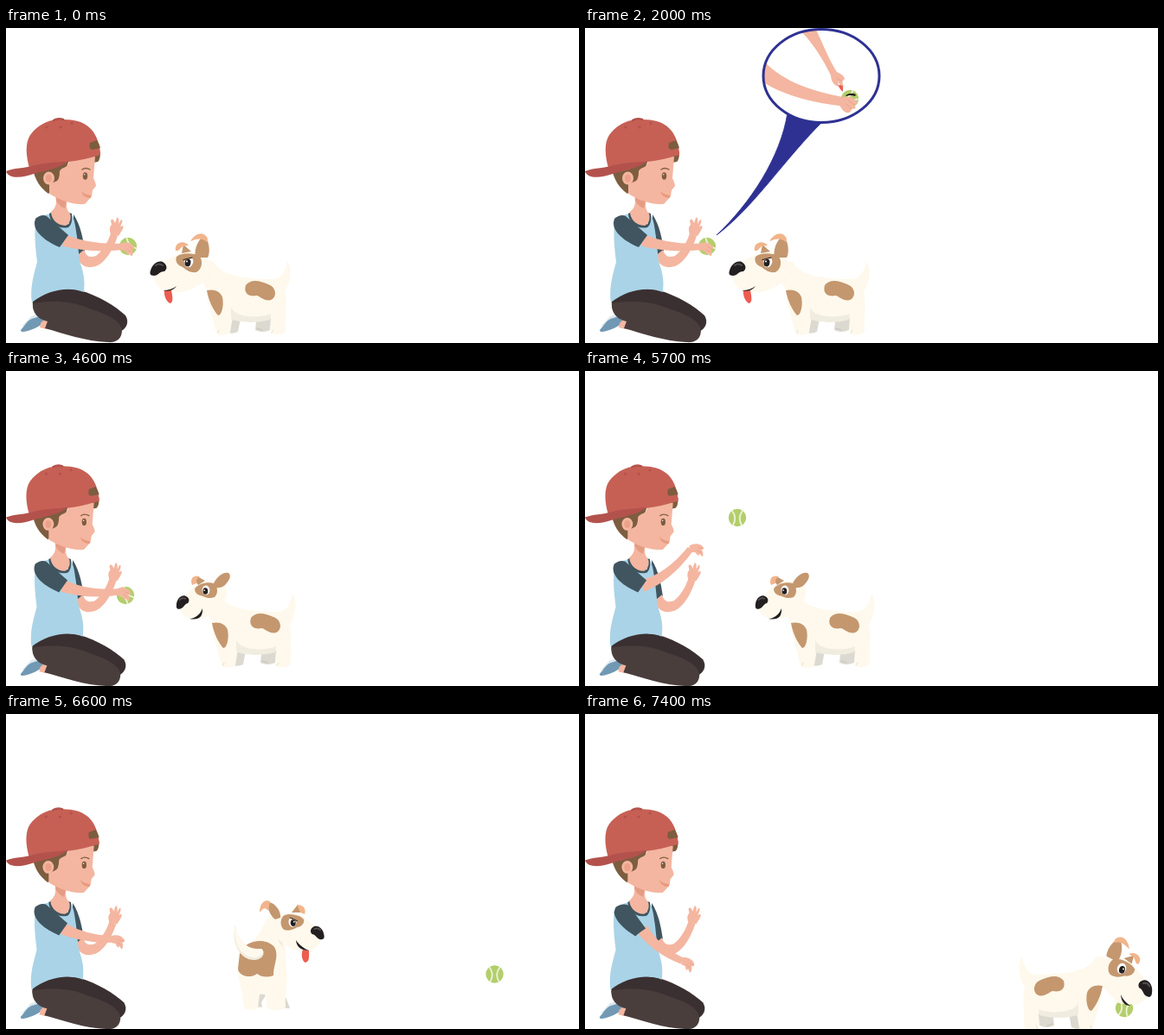
Write an HTML page with a canvas that moves like this. It is 662x365 px and loops after 8000 ms.

```html
<!DOCTYPE html>
<html lang="en">
<head>
<meta charset="utf-8">
<title>Fetch</title>
<style>
html, body { margin: 0; width: 100%; height: 100%; overflow: hidden; background: #fff; }
canvas { display: block; width: 662px; height: 365px; }
</style>
</head>
<body>
<canvas id="stage"></canvas>
<script>
const W = 662, H = 365, LOOP = 8000, STEP = 100;
const canvas = document.getElementById('stage');
const ctx = canvas.getContext('2d');
const dpr = window.devicePixelRatio || 1;
canvas.width = W * dpr;
canvas.height = H * dpr;

const SKIN = '#f4b6a0', SHADE = '#e59c85', HAIR = '#7d5d3f', CAP = '#c66055', BRIM = '#b3524c';
const SHIRT = '#aad3e7', SLEEVE = '#40555f', INK = '#231f20', NAVY = '#2e3192';
const CREAM = '#fef9ec', DUSK = '#f0ecdf', GREY = '#dcd9d0', TAN = '#c4976f', PEACH = '#f2b48b', RED = '#ee5c50';

function fill(color, d) {
  ctx.fillStyle = color;
  ctx.fill(new Path2D(d));
}
function line(color, width, d) {
  ctx.strokeStyle = color;
  ctx.lineWidth = width;
  ctx.lineCap = 'round';
  ctx.stroke(new Path2D(d));
}
function oval(color, x, y, rx, ry = rx, rot = 0) {
  ctx.fillStyle = color;
  ctx.beginPath();
  ctx.ellipse(x, y, rx, ry, rot, 0, 7);
  ctx.fill();
}
function at(x, y, rot, sx, sy, draw) {
  ctx.save();
  ctx.translate(x, y);
  ctx.rotate(rot);
  ctx.scale(sx, sy);
  draw();
  ctx.restore();
}
// Keys are rows of [time, ...values].
function track(keys, t) {
  let i = 0;
  while (i < keys.length - 1 && keys[i + 1][0] <= t) i++;
  const a = keys[i], b = keys[i + 1] || a;
  const k = a === b ? 0 : (t - a[0]) / (b[0] - a[0]);
  return a.slice(1).map((v, j) => v + (b[j + 1] - v) * k);
}

// Bend point, wrist and hand angle of the near arm.
const ARM = [
  [0, 96, 256, 133, 253.5, 0], [4500, 96, 256, 133, 253.5, 0],
  [4600, 94, 260, 129, 256, 0], [4900, 94, 260, 129, 256, 0],
  [5200, 92, 265, 121, 269, .3], [5400, 96, 248, 126, 226, -.1],
  [5500, 96, 240, 122, 206, -.15], [5900, 96, 240, 122, 206, -.15],
  [6300, 98, 256, 125, 250, 0], [6600, 92, 261, 122, 261, .05],
  [6900, 90, 267, 119, 273, .15], [7200, 82, 273, 112, 286, .25], [8000, 82, 273, 112, 286, .25]
];
const BALL = [
  [0, 141, 253], [4500, 141, 253], [4600, 138, 260], [4900, 138, 260],
  [5200, 130, 273], [5400, 137, 224], [5500, 137, 197], [5600, 153, 178], [5700, 176, 170],
  [5800, 206, 168.5], [6000, 272, 174], [6300, 386, 209], [6600, 564.5, 301.5],
  [6700, 590, 329], [6900, 621, 354], [7300, 621, 354], [7400, 623, 341]
];

function ball(x, y, rot = 0) {
  at(x, y, rot, 1, 1, () => {
    oval('#b3ce6b', 0, 0, 10.2);
    line('#edf3da', 1.8, 'M-6 -8Q0 0 -5 8.5M6 -8Q0 0 5 8.5');
  });
}

function hand() {
  fill(SKIN, 'M-1 -3.7C5 -6 11 -5 14 -1C16 1 15 3 13 3L12 2C14 6 14 10 12 11L9 7C9 10 7 10 5 5L0 4Z');
  line(SHADE, .7, 'M7 3L11 6M9 0L13 2');
}

function arm([cx, cy, wx, wy, rot], bx, by) {
  const n0 = Math.atan2(cy - by, cx - bx) + Math.PI / 2;
  const n1 = Math.atan2(wy - cy, wx - cx) + Math.PI / 2;
  const off = (x, y, a, r) => [x + Math.cos(a) * r, y + Math.sin(a) * r];
  const mid = (n0 + n1) / 2;
  ctx.fillStyle = SKIN;
  ctx.beginPath();
  ctx.moveTo(...off(bx, by, n0, 7));
  ctx.quadraticCurveTo(...off(cx, cy, mid, 5), ...off(wx, wy, n1, 3.8));
  ctx.lineTo(...off(wx, wy, n1, -3.8));
  ctx.quadraticCurveTo(...off(cx, cy, mid, -5), ...off(bx, by, n0, -7));
  ctx.fill();
  at(wx, wy, rot, 1, 1, hand);
}

function boyBack() {
  fill(SLEEVE, 'M78 216C86 228 89 244 91 258L83 265L78 235Z');
  fill(SKIN, 'M84 262L90 257C93 266 98 266 104 264C113 257 118 247 121 238L129 241C124 256 115 272 104 276C95 279 87 276 84 269Z');
  fill(SKIN, 'M121 239C119 233 120 230 122 228L121 223C123 220 125 223 126 226L128 220C130 219 131 221 130 227L133 222C135 222 135 225 132 230L135 229C137 231 133 236 130 241Z');
  // shoe, ankle, trousers
  fill('#dce9ef', 'M18 346L29 334L39 331L31 342Z');
  fill('#7199b4', 'M17 350C22 345 25 337 33 336L44 332L47 338C40 346 28 351 20 352Q17 352 17 350Z');
  fill(SKIN, 'M40 342L45 337L50 340L47 349L39 347Z');
  fill('#3b3031', 'M31 314C48 303 66 300 86 304C108 311 126 322 138 333C143 341 139 349 131 352L70 342L40 337C32 331 30 322 31 314Z');
  fill('#4a3e3d', 'M31 319C55 315 78 317 96 325C115 331 132 338 134 350C134 360 128 365 117 364C92 363 67 354 45 348L48 340C36 337 30 329 31 319Z');
  // shirt, neck
  fill(SHIRT, 'M35 222C43 217 50 215 55 214L74 214C79 219 80 228 82 242L85 270C91 287 91 294 90 306C73 299 48 303 30 318C27 299 34 280 36 271C34 254 32 237 35 222Z');
  fill(SLEEVE, 'M50 215L54 213C53 226 64 230 73 227L72 214L76 215C77 224 75 229 72 231C60 234 50 225 50 215Z');
  fill(SKIN, 'M57 194L71 198C69 206 70 211 74 215C76 222 73 227 69 229C58 229 52 220 52 213C58 208 59 203 57 194Z');
  fill(SHADE, 'M58 195L70 200L68 209Q62 207 58 200Z');
}

function boyHead() {
  fill(HAIR, 'M31 164L73 152L66 175L49 192C39 185 34 176 31 164Z');
  fill(HAIR, 'M102 147L109 143Q109 153 106 155L101 156Z');
  fill(SKIN, 'M50 181L57 178Q62 177 62 166C65 160 71 164 73 154L103 149L101 174Q104 180 104 183L100 188L99 195Q93 202 91 204C80 205 64 201 50 192Z');
  oval(SKIN, 49.5, 174, 6.5, 7.5);
  oval('#eca28a', 49.5, 174, 3.6, 4.6);
  oval(HAIR, 91.5, 171.5, 2.7, 4.2);
  oval('#fff', 90.8, 169.7, .7);
  line(HAIR, 1.4, 'M88 164Q92 161 97 164');
  fill('#e99a7e', 'M87 189Q91 193 98 194L98 197Q89 197 87 189Z');
  fill(CAP, 'M27 162C23 148 22 133 28 124C35 114 46 108 54 107Q60 103 67 106C92 106 101 118 105 128C108 135 109 142 109 147Q90 153 72 155Q47 157 27 162Z');
  fill(BRIM, 'M0 166C9 162 20 163 33 159C49 155 61 156 73 154C60 164 43 165 32 169C18 174 3 175 0 166Z');
  line(BRIM, 2.5, 'M55 107Q60 104 66 106');
  for (const [x, y] of [[47, 115], [63, 115], [76, 110.5]]) oval(BRIM, x, y, 1.7, 1.4);
  fill(HAIR, 'M97 133L105 130Q108 135 109 139L100 141Q95 141 97 133Z');
}

function boy(t) {
  const near = t < 4600;
  const fit = draw => near ? draw() : at(0, 5.7, 0, .987, .987, draw);
  const pose = track(ARM, t);
  fit(() => { boyBack(); boyHead(); });
  if (t < 5600) {
    ball(...track(BALL, t), -.8);
    if (t >= 3000 && near) line(INK, 1.6, 'M137 246Q141 243 146 246');
  }
  arm(pose, near ? 67 : 66, near ? 246 : 249);
  if (t >= 7100) fit(() => fill(SLEEVE, 'M36 221Q46 215 52 220L71 246Q66 249 59 255C46 247 35 237 34 227Z'));
  else fit(() => fill(SLEEVE, 'M34 221Q41 215 47 218L72 240L62 254C45 247 32 236 33 225Z'));
  if (t >= 3200 && t < 3600) {
    const [x, y] = t < 3400 ? [136, 236] : [138, 241.5];
    oval(RED, x, y, 1.8, 3, -.3);
  }
}

function callout(t) {
  const wedge = 'M234 98C226 150 191 203 152 240C195 208 232 150 276 107Z';
  fill(NAVY, wedge);
  line(NAVY, .8, wedge);
  const bubble = new Path2D();
  bubble.ellipse(273, 55.5, 67, 54, 0, 0, 7);
  ctx.fillStyle = '#fff';
  ctx.fill(bubble);
  ctx.save();
  ctx.clip(bubble);
  ball(306, 82, 1);
  if (t >= 2000) fill(INK, 'M301 78Q307 74 313 77L312 79Q306 77 302 79Z');
  fill(SKIN, 'M203 34C228 64 265 73 298 80C306 78 313 82 315 87L311 89L313 93L308 94Q307 99 302 98C297 96 296 92 294 90C257 86 222 75 202 60Z');
  line(SHADE, .8, 'M304 84L311 89M302 88L308 94');
  const [dx, dy] = t < 1500 ? [10, -18] : t < 2000 ? [9, -3] : [0, 0];
  at(dx, dy, 0, 1, 1, () => {
    fill(RED, 'M292 66L298 66L298 74L295 71Z');
    fill(SKIN, 'M235 -22L260 -12C274 15 281 36 291 51Q299 54 300 59L297 62L299 68L295 66L292 62L294 69L289 66Q284 62 284 55C274 34 262 16 247 1Z');
    line(SHADE, .8, 'M291 58L297 62');
  });
  ctx.restore();
  ctx.strokeStyle = NAVY;
  ctx.lineWidth = 3;
  ctx.stroke(bubble);
}

// Dog heads look left with the eye at the zero point.
const EARS = {
  up: [
    [TAN, 'M8 -5C6 -14 10 -22 14 -27L21 -26C25 -18 24 -8 22 -5Z'],
    [PEACH, 'M2 -24C8 -34 18 -36 22 -27L21 -23C14 -29 8 -26 2 -24Z'],
    [TAN, 'M-8 -10L-6 -20L3 -12Z'],
    [PEACH, 'M-15 -13C-17 -23 -5 -26 0 -19L-7 -18L-12 -13Z']
  ],
  alert: [
    [TAN, 'M9 -8C12 -15 20 -22 26 -20C30 -17 27 -11 21 -5Q16 -2 11 -3Z'],
    [TAN, 'M-10 -16L-1 -11L-9 -6Q-13 -10 -10 -16Z'],
    [PEACH, 'M-16 -6C-19 -14 -14 -18 -7 -16Q-12 -13 -11 -8Z']
  ],
  turned: [
    [TAN, 'M14 -5C13 -14 22 -23 28 -23C30 -14 24 -6 20 -3Z'],
    [PEACH, 'M26 -24C34 -27 38 -19 38 -11C34 -17 31 -17 28 -13Z'],
    [TAN, 'M1 -11L-6 -20L-10 -11Z'],
    [PEACH, 'M-5 -20C-13 -20 -16 -15 -14 -9L-9 -11Z']
  ],
  swept: [
    [TAN, 'M17 -2C18 -10 22 -15 33 -16C37 -10 29 0 22 0Q18 1 17 -2Z'],
    [PEACH, 'M43 -14C41 -24 30 -27 22 -18L33 -16Z'],
    [PEACH, 'M21 -22C18 -28 10 -28 5 -24L10 -18Z'],
    [TAN, 'M12 -26C4 -24 0 -18 -5 -12L9 -17Z']
  ]
};

function face(stern) {
  fill(CREAM, 'M-38 8C-30 -4 -20 -4 -8 -11C4 -14 20 -8 27 4C28 16 20 24 4 31C-6 37 -24 37 -34 30C-41 22 -44 14 -38 8Z');
  fill(TAN, 'M-14 -6C-8 -11 6 -11 13 -6C17 0 15 9 9 12C1 13 -3 9 -7 6C-13 4 -16 -1 -14 -6Z');
  oval('#fff', 0, 0, 5.2, 6.4, .2);
  oval(INK, -1, 1, 3.4, 4.4, .2);
  oval('#fff', -2, -.5, 1);
  if (stern) {
    fill(TAN, 'M-8 -9L8 -9L6 -5L-7 -1Z');
    line(INK, 1, 'M-6 -2.5L4 -5');
  }
  fill(INK, 'M-44 10C-42 3 -36 -2 -30 0C-25 3 -24 8 -28 11C-34 11 -35 16 -40 16C-45 16 -45 13 -44 10Z');
  line('#57504f', 2, 'M-38 4Q-34 1 -30 4');
}

// A dog with its tongue out also frowns.
function head(ears, scale, tilt, mouth, tongue) {
  at(0, 0, tilt, scale, scale, () => face(tongue));
  EARS[ears].forEach(e => fill(...e));
  if (tongue) fill(RED, tongue);
  if (mouth) fill(INK, mouth);
}
const GRIN = 'M-19 33C-12 33 -6 27 -4 21Q-3 36 -19 33Z';
const SMIRK = 'M-19 33C-14 31 -8 27 -4 21Q-5 33 -19 33Z';
const LIP = 'M-30 33Q-20 33 -14 28Q-19 35.5 -30 33Z';

function standing() {
  fill(GREY, 'M260 334L271 336L268 352Q262 355 257 353Z');
  fill(GREY, 'M289 340Q297 334 306 336L305 350Q296 354 288 350Z');
  line('#c5c2ba', 1, 'M290 348L296 350');
  fill(CREAM, 'M222 285C230 266 237 266 243 275C252 288 280 291 308 291C320 290 323 280 325 270C331 278 329 296 322 305C325 320 322 335 323 350C323 356 306 357 306 353L306 335C295 342 275 342 262 335L259 352C258 357 243 357 243 353C240 340 232 315 232 304C229 298 226 292 222 285Z');
  fill(DUSK, 'M260 324C266 337 295 336 306 331L305 338C290 342 270 342 260 337Z');
  fill(DUSK, 'M226 292Q235 285 234 276Q240 288 229 293Z');
  fill(TAN, 'M232 304C240 302 248 305 250 312C252 322 249 333 245 333C240 328 234 316 232 304Z');
  fill(TAN, 'M277 298C283 290 294 293 303 297C312 300 313 310 308 314C301 318 296 313 290 310C281 312 274 308 277 298Z');
  line('#e3dac8', .8, 'M245 353L246 350M307 353L309 350');
}

function turnedDog() {
  fill(GREY, 'M290 324L301 325L295 334L296 340L287 339Z');
  fill(GREY, 'M314 341L321 322L328 341Z');
  fill(CREAM, 'M306 232C297 242 294 256 284 264L270 275C266 290 268 305 272 320L275 341C280 344 290 343 291 340L293 325C298 320 301 325 301 340C305 344 320 344 323 340C322 325 326 310 324 295C323 280 322 270 325 255Z');
  fill(DUSK, 'M312 248Q312 262 320 271Q318 260 322 255Z');
  fill(TAN, 'M270 278C275 262 300 258 310 270C316 280 309 290 309 303Q298 307 290 301C280 308 268 302 268 295Z');
  fill(DUSK, 'M265 244C259 266 271 286 288 285C298 284 300 275 295 272C278 274 267 262 265 244Z');
  fill(CREAM, 'M265 244C261 265 272 282 287 282C297 281 299 275 295 272C278 274 267 262 265 244Z');
  at(331, 241, 0, -1, 1, () => head('turned', .88, -.18, SMIRK, 'M-12 32C-9 38 -12 47 -15 47C-20 46 -19 39 -19 33Z'));
}

function runningDog(dx) {
  at(dx, 0, 0, 1, 1, () => {
    fill(GREY, 'M444 318L420 322C412 326 410 332 413 336C420 338 425 333 432 338C442 340 444 330 444 320Z');
    fill(GREY, 'M490 346C502 345 508 352 520 351C528 351 533 357 529 362C518 364 505 352 490 346Z');
    fill(CREAM, 'M417 296C430 303 445 306 458 303C480 303 505 300 520 286L548 300C555 318 550 325 541 338L549 347C546 354 535 353 525 349Q515 345 510 341C495 350 470 348 455 343C440 348 432 356 424 357C418 354 425 348 430 344C438 335 440 325 445 318C436 312 425 305 417 296Z');
    fill(DUSK, 'M458 342Q482 345 508 338L505 346Q480 350 458 342Z');
    fill(TAN, 'M453 318C455 311 462 312 468 306C476 300 486 302 486 309C485 316 480 318 478 323C472 329 455 328 453 318Z');
    at(552, 292, 0, -1, 1, () => head('swept', .94, 0, 'M-28 32Q-18 31 -9 20Q-14 34 -28 32Z', 'M-17 26C-20 36 -10 48 -4 47C1 44 -2 34 -8 26Z'));
  });
}

function fetchingDog(t) {
  const [dy, tilt] = t < 7200 ? [0, .5] : t < 7300 ? [4, .58] : t < 7400 ? [8, .62] : [0, .46];
  const caught = t >= 7400;
  at(830, 11, 0, -1, 1, standing);
  at(620, 295 + dy, tilt, -1, 1, () => head('up', 1, 0, caught ? '' : LIP));
  if (caught) {
    ball(...track(BALL, t), .15);
    // muzzle over the top of the ball
    fill(CREAM, 'M610 322L640 326L634 336Q622 337 612 333Z');
    fill(INK, 'M619 325Q622 333 630 338Q620 338 619 325Z');
  }
}

function dog(t) {
  if (t < 4600) {
    standing();
    at(211, 271, 0, 1, 1, () => head('up', 1, 0, LIP, 'M-28 33C-29 41 -24 48 -21 48C-17 46 -19 39 -20 33Z'));
  } else if (t < 6100) {
    at(6, -12, 0, 1, 1, standing);
    at(231, 254, 0, 1, 1, () => head('alert', .85, -.25, GRIN));
  } else if (t < 6700) {
    turnedDog();
  } else if (t < 7100) {
    runningDog((t - 6900) * (t < 6900 ? .55 : .4));
  } else {
    fetchingDog(t);
  }
}

function frame(now) {
  const t = Math.floor((now % LOOP) / STEP) * STEP;
  ctx.setTransform(dpr, 0, 0, dpr, 0, 0);
  ctx.fillStyle = '#fff';
  ctx.fillRect(0, 0, W, H);
  if (t >= 500 && t < 3000) callout(t);
  boy(t);
  if (t >= 5600 && t < 7400) ball(...track(BALL, t));
  dog(t);
  requestAnimationFrame(frame);
}
const start = performance.now();
requestAnimationFrame(now => frame(Math.max(0, now - start)));
</script>
</body>
</html>
```
